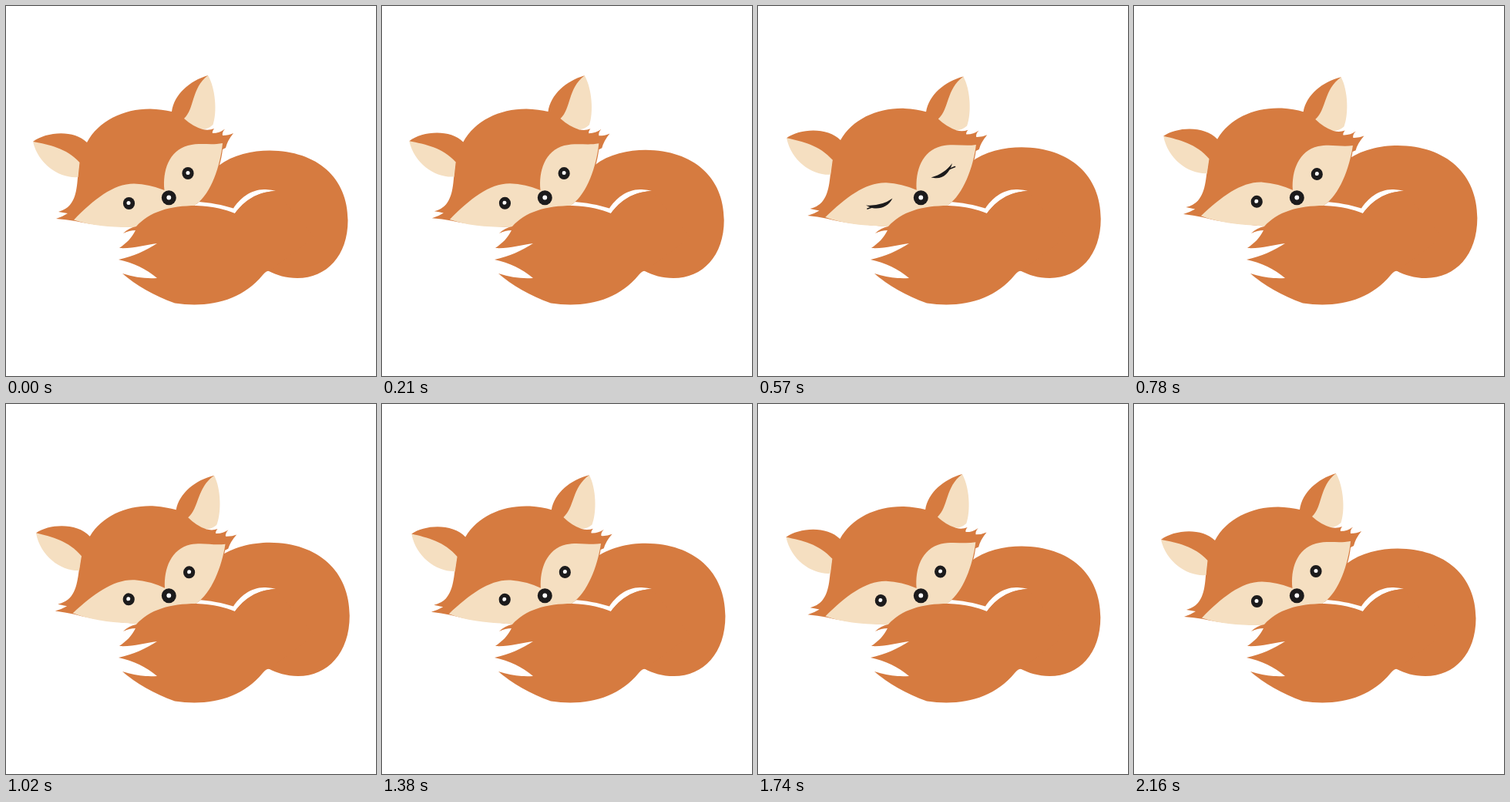
An HTML page for the animation above (2.19 s loop, 480x480 px).

```html
<!DOCTYPE html>
<html lang="en">
<head>
<meta charset="utf-8">
<title>Dozing fox</title>
<style>
  html, body { margin: 0; width: 100%; height: 100%; overflow: hidden; background: #fff; }
  svg { display: block; width: 100vw; height: 100vh; }
  .fur { fill: #d67b40; }
  .cream { fill: #f5dfc1; }
  .ink { fill: #1c1b1c; }
  .lash { fill: none; stroke: #1c1b1c; stroke-width: 1.6; stroke-linecap: round; }
  .glint { fill: #fff; }
</style>
</head>
<body>
<svg viewBox="0 0 480 480">
  <path id="back" class="fur" d="M235 252 C250 232 262 217 276 207 C294 193 320 187.500 342 187.500
    C404 188 443.500 223 443.500 278 C443.500 324 416 353 378 353 C363 353 351 349 341 344 L300 300 Z"/>
  <path fill="#fff" d="M245 253.500 C265 255 281 258 295 262.500 C303 250 318 237 337 238 Q345 238.500 350 240
    C325 241 309 253 297 269 L285 275 L245 262 Z"/>

  <g id="head">
    <path class="fur" d="M35 176 C52 163 88 160 105 177 C120 149 152 133.500 187 133.500 Q203 134 215 137
      C218 115 238 97 262 90 L255 160 Q263 162 270 159 Q267 163 268 165 Q277 165 284 159.500
      Q280 164 281 168 Q289 168 295 165 Q287 175 285 184 L281 186 C278 212 266 243 247 257
      L170 287 C136 286 112 284 90 279 Q78 277 65 276 Q74 273 80 269 Q74 268 68 267 Q78 264 83 258
      C94 245 92 224 95 203 Z"/>
    <path class="cream" d="M35 176 C56 180 78 184 95.500 203 L93.500 222 C70 224 42 206 35 176 Z"/>
    <path class="cream" d="M262 90 C272 107 274 138 268.500 154 Q262 160 255 160 Q242 156 231 146
      C245 133 240 107 262 90 Z"/>
    <path class="cream" d="M88 277.500 C114 251 139 230.500 166 230.500 Q186 231 205.500 239
      C203 214 211 188 236 181 C252 177 266 181 281 178 C278 208 266 243 247 257
      L205 290 L160 287 C135 287 110 285 88 277.500 Z"/>
    <g id="open">
      <ellipse class="ink" cx="159.500" cy="256" rx="7.600" ry="8"/>
      <circle class="glint" cx="159" cy="255.500" r="2.500"/>
      <ellipse class="ink" cx="236" cy="217" rx="7.600" ry="8"/>
      <circle class="glint" cx="236" cy="216.500" r="2.500"/>
    </g>
    <g id="shut" transform="rotate(-1.550 211 249)">
      <path class="ink" d="M140 258.500 Q160 260 174.500 249.500 C169 261 156 265 145 261 Z"/>
      <path class="lash" d="M142 263 L148 261"/>
      <path class="ink" d="M224.500 222.500 C237 219 245 213 252 204 C248 218 239 225 228 223 Z"/>
      <path class="lash" d="M247 212 L255.500 208.500"/>
    </g>
  </g>

  <path class="fur" d="M152 295 Q159 288 169 286 C186 267 212 259 247 259 C270 260 285 264 297 269
    C309 253 325 241 350 240 L400 300 L342 344 Q338 343 333 349 C305 383 262 392 219 385.500
    C192 376 168 362 151 347 C167 352 181 354 196 353 C182 341 165 333 146 329
    C165 325 182 317 196 308 C180 310 164 315 147 314 C157 307 163 301 168 291 Q160 291 152 295 Z"/>
  <g id="nose">
    <circle class="ink" cx="211.300" cy="248.700" r="9.500"/>
    <circle class="glint" cx="211.300" cy="248.500" r="2.900"/>
  </g>
</svg>
<script>
  const LOOP = 2190, STEP = 30;
  const BLINK = [450, 720];
  const TILT = 2.95;
  const el = id => document.getElementById(id);
  const back = el('back'), head = el('head'), open = el('open'), shut = el('shut');
  const show = (node, on) => node.setAttribute('visibility', on ? 'visible' : 'hidden');

  function draw(ms) {
    const t = Math.floor((ms % LOOP) / STEP) * STEP;
    const breath = (1 - Math.cos(2 * Math.PI * t / LOOP)) / 2;
    const closed = t >= BLINK[0] && t < BLINK[1];
    // The back swells upward from its base while the head tilts about the nose.
    back.setAttribute('transform',
      `translate(340 353) scale(${1 + 0.022 * breath} ${1 + 0.048 * breath}) translate(-340 -353)`);
    head.setAttribute('transform', `rotate(${TILT * breath} 211 249)`);
    show(open, !closed);
    show(shut, closed);
  }

  const start = performance.now();
  function tick() {
    draw(performance.now() - start);
    requestAnimationFrame(tick);
  }
  tick();
</script>
</body>
</html>
```
